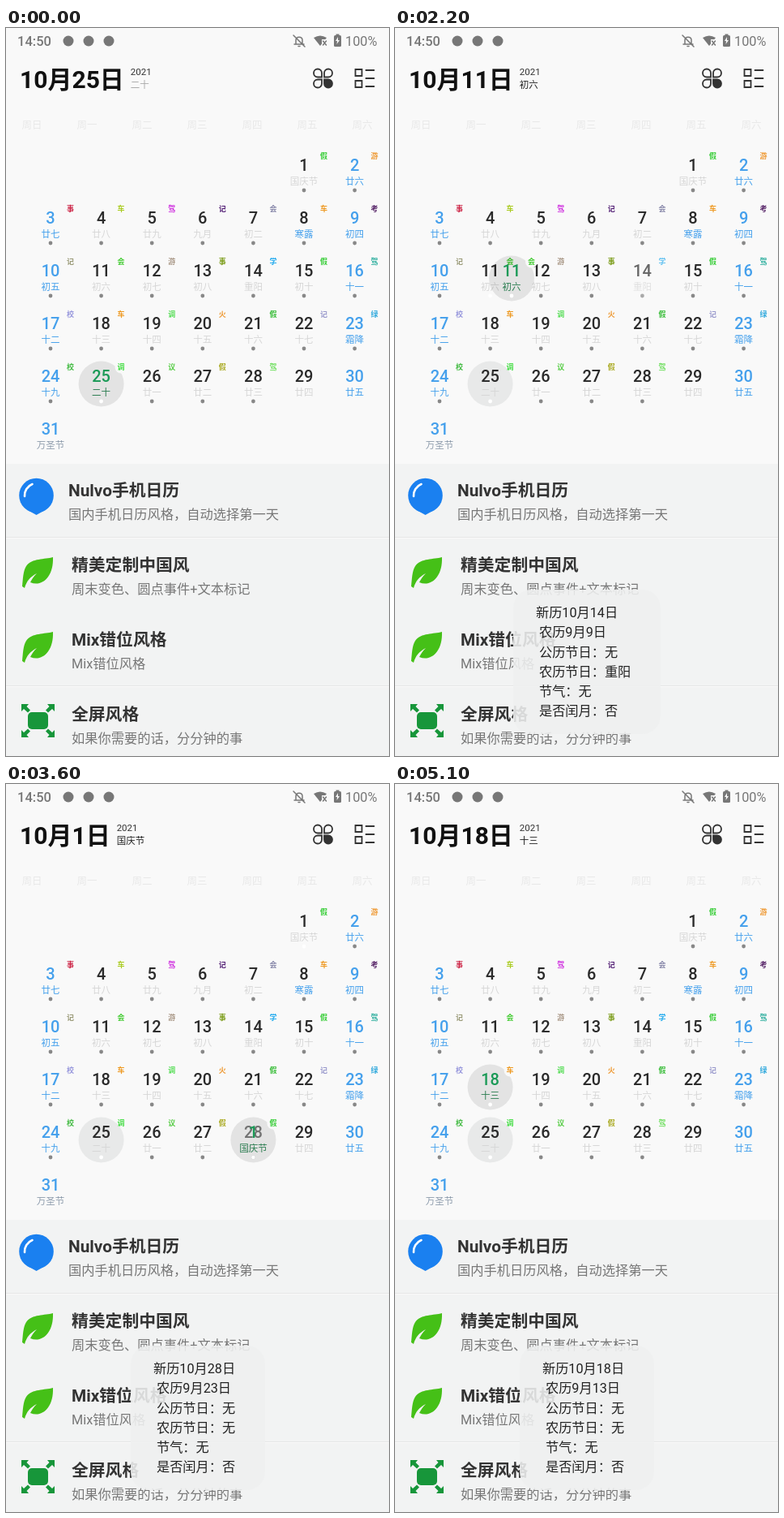
Write an HTML page with a canvas that moves like this. It is 473 px wide and 897 px high and loops after 5200 ms.

```html
<!DOCTYPE html>
<html lang="zh-CN">
<head>
<meta charset="utf-8">
<style>
html, body { margin: 0; width: 100%; height: 100%; overflow: hidden; background: #f9f9f9; }
canvas { display: block; }
</style>
</head>
<body>
<canvas id="stage" width="473" height="897"></canvas>
<script>
const ctx = document.getElementById('stage').getContext('2d');
const FONT = 'Roboto, "Noto Sans CJK SC", "Noto Sans CJK JP", "Noto Sans CJK", sans-serif';
const LOOP = 5200, STEP = 100, MOVE = 400, TODAY = 25;
const PAPER = '#f9f9f9', PANEL = '#f2f3f3', GREY = '#777';

const lunar = ('国庆节 廿六 廿七 廿八 廿九 九月 初二 寒露 初四 初五 初六 初七 初八 重阳 初十 十一 十二 十三 ' +
  '十四 十五 十六 十七 霜降 十九 二十 廿一 廿二 廿三 廿四 廿五 万圣节').split(' ');
const marks = '假游事车驾记会车考记会游事学假驾校车调火假记绿校调议假驾';
const markColors = ('#3c3 #e93 #c24 #ac2 #c2d #527 #88a #e92 #526 #997 #4c3 #a98 #791 #2ae ' +
  '#3c3 #2a9 #99d #e92 #5d5 #e93 #3b3 #99c #3ad #4b4 #4d4 #5c4 #aa2 #6d5').split(' ');

// Each tap: start time, selected day, time until everything rests
const taps = [[-9999, 25, 500], [1100, 14, 500], [2100, 11, 500], [2800, 28, 400], [3600, 1, 500], [4600, 18, 500]]
  .map(([start, day, length]) => ({ start, day, length }));

const clamp = v => Math.max(0, Math.min(1, v));
const mix = (a, b, p) => a + (b - a) * p;
const overshoot = p => { const u = p - 1; return u * u * (3 * u + 2) + 1; };
const place = day => ({ x: 55 + (day + 4) % 7 * 62.6, y: 169 + Math.floor((day + 4) / 7) * 65 });

function text(str, x, y, size, color, weight = 400, align = 'left') {
  ctx.font = `${weight} ${size}px ${FONT}`;
  ctx.textAlign = align;
  ctx.fillStyle = color;
  ctx.fillText(str, x, y + size * 0.37);
  return ctx.measureText(str).width;
}
function rect(x, y, w, h, color, r = 0) {
  ctx.fillStyle = color;
  ctx.beginPath();
  ctx.roundRect(x, y, w, h, r);
  ctx.fill();
}
function disc(x, y, r, color) {
  ctx.fillStyle = color;
  ctx.beginPath();
  ctx.arc(x, y, r, 0, 7);
  ctx.fill();
}
function path(d, x, y, fill, stroke, width = 1.5, flipX = 1, flipY = 1) {
  const shape = new Path2D(d);
  ctx.save();
  ctx.translate(x, y);
  ctx.scale(flipX, flipY);
  if (fill) { ctx.fillStyle = fill; ctx.fill(shape); }
  if (stroke) { ctx.strokeStyle = stroke; ctx.lineWidth = width; ctx.lineCap = 'round'; ctx.stroke(shape); }
  ctx.restore();
}

function statusBar() {
  text('14:50', 14, 16, 16.5, GREY, 500);
  for (const x of [77, 102, 127]) disc(x, 16, 6.5, GREY);
  path('M3 12 V7 C3 2 11 2 11 7 V12 M1 12 H13 M6 14.5 H8 M0 1 L14 15', 355, 8, null, GREY);
  path('M0 3 Q8 -2 16 3 L8 13 Z', 380, 9, GREY);
  rect(390, 14, 8, 8, PAPER);
  path('M0 0 L4 5 M4 0 L0 5', 391.5, 16, null, GREY);
  rect(405, 9, 9, 14, GREY, 1.5);
  rect(407.5, 7.5, 4, 2, GREY);
  path('M5 2 L2 7 H4 L3.5 11 L7 6 H5 Z', 405, 9, PAPER);
  text('100%', 419, 16, 16.3, GREY);
}

function header(day) {
  const right = 25 + text(`10月${day}日`, 17, 63, 30, '#111', 600);
  text('2021', right, 54, 11.5, '#333');
  text(lunar[day - 1], right, 70, 11.5, day === TODAY ? '#aaa' : '#222');

  const ring = 'M10.5 5.5 A5 5 0 1 0 5.5 10.5 H10.5 Z';
  for (const [sx, sy] of [[1, 1], [-1, 1], [1, -1], [-1, -1]])
    path(ring, 391.5 - sx * 12, 62 - sy * 12, sx + sy < 0 ? '#333' : null, '#333', 1.8, sx, sy);
  path('M1 1 H9 V9 H1 Z M1 15 H9 V23 H1 Z M14 2 H24 M14 12 H24 M14 22 H24', 430.5, 50, null, '#333', 1.8);

  [...'日一二三四五六'].forEach((c, i) => text('周' + c, 32 + i * 68, 119, 12.5, '#e8e8e8', 400, 'center'));
}

function mark(day, x, y) {
  if (marks[day - 1]) text(marks[day - 1], x + 24.5, y - 11, 9, markColors[day - 1], 700, 'center');
}

function dayCell(day, selected, settled) {
  const { x, y } = place(day);
  if (day === TODAY && !settled) disc(x, y + 9.5, 28, '#e8e9e9');
  if (settled && selected) return;
  const weekend = x < 60 || x > 425, blue = '#45a0ec';
  text(day, x, y, 20, weekend ? blue : '#2a2a2a', 500, 'center');
  const lunarColor = day === 31 ? '#8e9cac' : weekend || day === 8 ? blue : '#d6d6d6';
  text(lunar[day - 1], x, y + 20, 11.5, lunarColor, 400, 'center');
  if (day <= 28) disc(x, y + 31, 2.4, selected || day === TODAY ? '#fff' : '#888');
  mark(day, x, y);
}

function calendar(tap, previous, elapsed) {
  const p = clamp(elapsed / MOVE);
  for (let day = 1; day <= 31; day++) {
    // The day just left fades back in
    ctx.globalAlpha = day === previous.day ? mix(0.6, 1, p) : 1;
    dayCell(day, day === tap.day, day === tap.day && p === 1);
  }
  ctx.globalAlpha = 1;

  const from = place(previous.day), to = place(tap.day), k = overshoot(p);
  const x = mix(from.x, to.x, k), y = mix(from.y, to.y, k);
  disc(x, y + 9.5, 28, 'rgba(0,0,0,.09)');
  disc(x + 24.5, y - 11, 7.5, PAPER);
  text(tap.day, x, y, 20, '#1b9a57', 500, 'center');
  text(lunar[tap.day - 1], x, y + 20, 11.5, '#2b7d50', 400, 'center');
  disc(x, y + 31, 2.4, '#fff');
  mark(tap.day, x, y);
}

function balloon() {
  const blue = '#1a80f0';
  disc(37.5, 576, 21.3, blue);
  path('M-14.5 15 Q-6 21 0 24 Q6 21 14.5 15 Z', 37.5, 576, blue);
  path('M-14.5 1 A15 15 0 0 1 -5 -14', 37.5, 576, null, '#fff', 2.6);
}
function leaf(y) {
  path('M38 1 C28 4 12 2 5 12 C1 18 1 28 0 37 L3 39 C5 31 10 25 18 21 C14 25 12 28 10 32 C24 38 39 26 38 1 Z',
    20, y, '#45c017');
}
function expand() {
  const green = '#17963a';
  rect(27, 843, 25, 21, green, 5);
  for (const sx of [1, -1]) for (const sy of [1, -1])
    path('M0 0 H9 L6.5 3 L11 7.5 L8 10.5 L3 6 L0 9 Z', 39.5 - sx * 20.5, 853.5 - sy * 20.5, green, null, 0, sx, sy);
}

function menu() {
  rect(0, 537, 473, 360, PANEL);
  for (const y of [628, 811]) {
    rect(0, y - 1, 473, 1, '#e5e6e6');
    rect(0, y, 473, 1, '#fafafa');
  }
  balloon();
  leaf(651);
  leaf(743);
  expand();
  [
    ['Nulvo手机日历', '国内手机日历风格，自动选择第一天', 77, 569],
    ['精美定制中国风', '周末变色、圆点事件+文本标记', 81, 661],
    ['Mix错位风格', 'Mix错位风格', 81, 753],
    ['全屏风格', '如果你需要的话，分分钟的事', 81, 845]
  ].forEach(([title, note, x, y]) => {
    text(title, x, y, 20.8, '#333', 700);
    text(note, x, y + 30, 16.25, GREY);
  });
}

// Longest toast line, counted in characters
const toastChars = day => 5 + (day === 1 ? 3 : day === 14 ? 2 : 1);

function toastText(day, alpha) {
  const x = 230 - 8 * toastChars(day);
  const lunarDate = day < 6 ? `8月${day + 24}日` : `9月${day - 5}日`;
  ctx.globalAlpha = alpha;
  [
    `新历10月${day}日`,
    `农历${lunarDate}`,
    `公历节日：${day === 1 ? '国庆节' : '无'}`,
    `农历节日：${day === 14 ? '重阳' : '无'}`,
    '节气：无',
    '是否闰月：否'
  ].forEach((line, i) => text(line, x + (i ? 4 : 0), 720 + i * 24.3, 16.2, '#222'));
  ctx.globalAlpha = 1;
}

function toast(tap, previous, elapsed) {
  if (tap.day === TODAY) return;
  const q = clamp((elapsed - tap.length + 300) / 300);
  const first = previous.day === TODAY;
  const n = first ? toastChars(tap.day) : mix(toastChars(previous.day), toastChars(tap.day), q);
  ctx.globalAlpha = first ? q : 1;
  rect(202 - 8 * n, 692, 70 + 16 * n, 178, 'rgba(240,241,241,.88)', 22);
  if (!first) toastText(previous.day, 1 - q);
  toastText(tap.day, q);
}

function draw() {
  const now = Math.floor(performance.now() % LOOP / STEP) * STEP;
  const index = taps.findLastIndex(t => t.start <= now);
  const tap = taps[index], previous = taps[Math.max(0, index - 1)], elapsed = now - tap.start;
  rect(0, 0, 473, 897, PAPER);
  statusBar();
  header(tap.day);
  calendar(tap, previous, elapsed);
  menu();
  toast(tap, previous, elapsed);
  requestAnimationFrame(draw);
}
draw();
</script>
</body>
</html>
```
